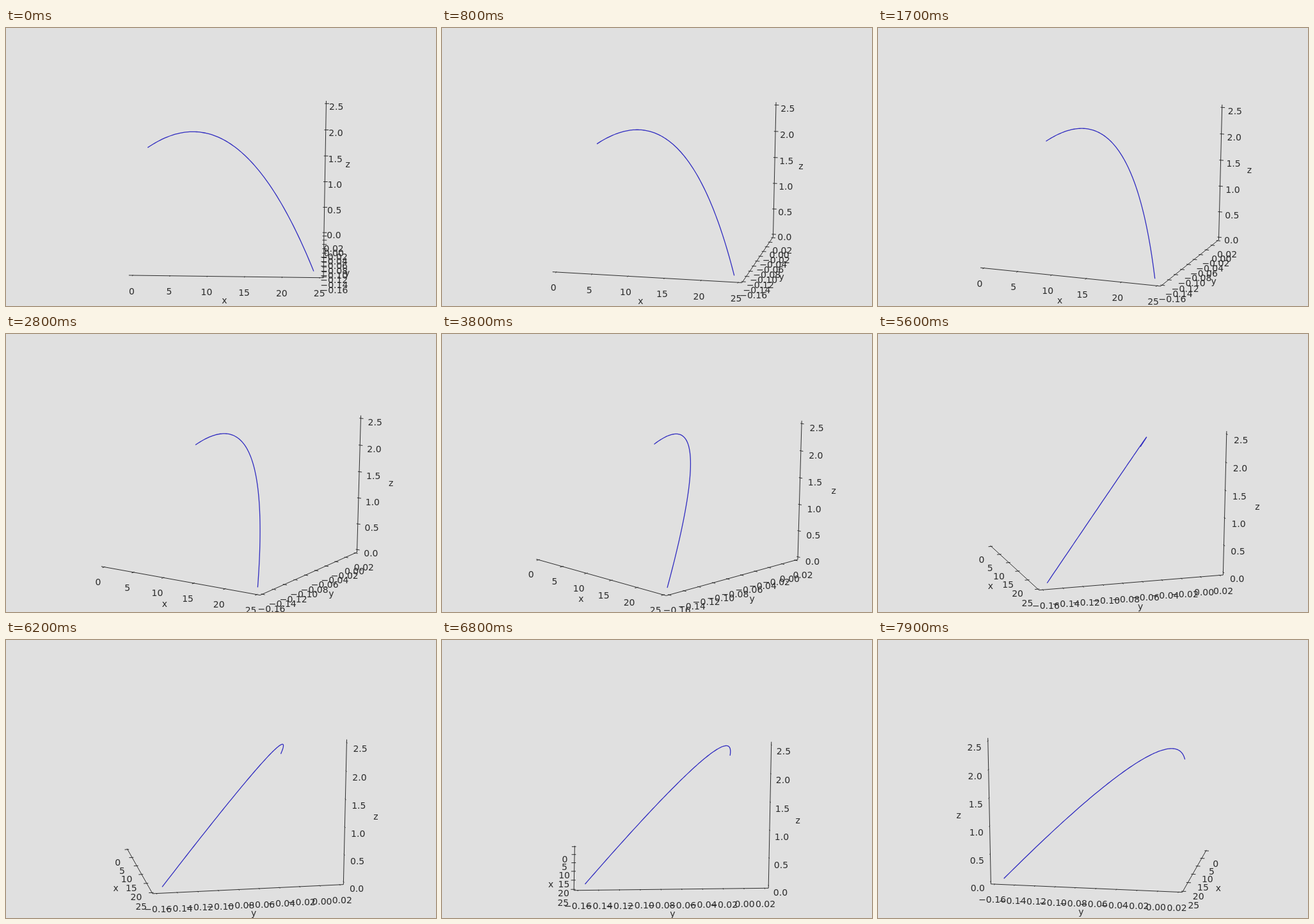
Recreate the animation shown at these times as an HTML page with a canvas. Size 672 by 435 pixels, loop 8 s.

```html
<!DOCTYPE html>
<html lang="en">
<head>
<meta charset="utf-8">
<title>Rotating trajectory plot</title>
<style>
  html, body { margin: 0; width: 100%; height: 100%; overflow: hidden; background: #e0e0e0; }
  canvas { display: block; }
</style>
</head>
<body>
<canvas id="stage" width="672" height="435"></canvas>
<script>
const ctx = document.getElementById('stage').getContext('2d');
const LOOP = 8000, STEP = 100;
const CENTER = { x: 351.6, y: 245.7 }, SCALE = { x: 2815, y: 2176 }, DIST = 10;
const INK = '#2c2c2c', CURVE = '#302cc0';
const DELTA = 1 / 12;              // spacing unit of the axes cube
const EDGE = 0.5 + DELTA / 4;      // axis lines overshoot the limits slightly
const TICK_GAP = EDGE + 0.7 * DELTA;
const LABEL_GAP = EDGE + 1.6 * DELTA;
const DRAG = 0.083;                // slows the flight along x

// [step, degrees]
const TURN = [[0, 3], [9, 13.4], [17, 20.6], [28, 33], [38, 45.3], [45, 55.8], [56, 72.3],
              [63, 80.6], [68, 87.4], [72, 92.2], [79, 100.2]];
const TILT = [[0, 14.3], [9, 16], [17, 16.7], [28, 17], [38, 16.7], [56, 15.6], [68, 15.2], [79, 14.2]];

const AXES = {
  x: { min: 0, max: 25, step: 5, digits: 0 },
  y: { min: -0.16, max: 0.02, step: 0.02, digits: 2 },
  z: { min: 0, max: 2.5, step: 0.5, digits: 1 }
};
const norm = (axis, v) => (v - AXES[axis].min) / (AXES[axis].max - AXES[axis].min) - 0.5;

// Smooth curve through the keys (Hermite with finite-difference slopes)
function track(keys, t) {
  const last = keys.length - 1;
  const slope = i => {
    const a = keys[Math.max(i - 1, 0)], b = keys[Math.min(i + 1, last)];
    return (b[1] - a[1]) / (b[0] - a[0]);
  };
  let i = 0;
  while (i < last - 1 && t > keys[i + 1][0]) i++;
  const [t0, v0] = keys[i], [t1, v1] = keys[i + 1];
  const h = t1 - t0, s = (t - t0) / h, s2 = s * s, s3 = s2 * s;
  return v0 * (2 * s3 - 3 * s2 + 1) + slope(i) * h * (s3 - 2 * s2 + s)
       + v1 * (3 * s2 - 2 * s3) + slope(i + 1) * h * (s3 - s2);
}

function makeCamera(azim, elev) {
  const ca = Math.cos(azim), sa = Math.sin(azim), ce = Math.cos(elev), se = Math.sin(elev);
  return ({ x, y, z }) => {
    const toward = ca * x + sa * y;
    const w = DIST - ce * toward - se * z;
    return [CENTER.x + SCALE.x * (ca * y - sa * x) / w,
            CENTER.y - SCALE.y * (ce * z - se * toward) / w];
  };
}

function stroke(points, color, width) {
  ctx.beginPath();
  points.forEach(p => ctx.lineTo(p[0], p[1]));
  ctx.strokeStyle = color;
  ctx.lineWidth = width;
  ctx.stroke();
}

// side: signs of the two fixed coordinates; tickDir: coordinate the ticks run along
function drawAxis(project, name, side, tickDir, drop) {
  const { min, max, step, digits } = AXES[name];
  const at = (along, out) => {
    const p = { [name]: along };
    for (const k in side) p[k] = side[k] * out;
    return p;
  };
  stroke([project(at(-EDGE, EDGE)), project(at(EDGE, EDGE))], INK, 1);

  const count = Math.round((max - min) / step);
  for (let i = 0; i <= count; i++) {
    const along = i / count - 0.5;
    const tick = [0.2, -0.1].map(f => {
      const p = at(along, EDGE);
      p[tickDir] += side[tickDir] * f * DELTA;
      return project(p);
    });
    stroke(tick, INK, 1);

    let value = min + i * step;
    if (Math.abs(value) < 1e-9) value = 0;
    const [x, y] = project(at(along, TICK_GAP));
    ctx.fillText(value.toFixed(digits).replace('-', '\u2212'), x, y + drop);
  }
  const [x, y] = project(at(0, LABEL_GAP));
  ctx.fillText(name, x, y + 3.9);
}

function drawCurve(project) {
  const points = [];
  for (let i = 0; i <= 100; i++) {
    const t = i / 100;
    points.push(project({
      x: norm('x', 24.2 * (t + DRAG * t * (1 - t))),
      y: norm('y', -0.153 * t * t),
      z: norm('z', 1.705 + 2.36 * t - 4.05 * t * t)
    }));
  }
  stroke(points, CURVE, 1.3);
}

function draw(step) {
  const turn = track(TURN, step), rad = Math.PI / 180;
  const project = makeCamera((turn - 90) * rad, track(TILT, step) * rad);
  const right = turn < 90 ? 1 : -1;

  ctx.fillStyle = '#e0e0e0';
  ctx.fillRect(0, 0, 672, 435);
  ctx.fillStyle = INK;
  ctx.font = '14px "DejaVu Sans", sans-serif';
  ctx.textAlign = 'center';
  ctx.textBaseline = 'alphabetic';
  ctx.lineJoin = 'round';

  drawAxis(project, 'x', { y: -right, z: -1 }, 'y', 12.9);
  drawAxis(project, 'y', { x: 1, z: -1 }, 'x', 12.9);
  drawAxis(project, 'z', { x: 1, y: right }, 'x', 12.3);
  drawCurve(project);
}

const start = performance.now();
function loop() {
  const time = (performance.now() - start) % LOOP;
  draw(Math.floor(time / STEP));
  requestAnimationFrame(loop);
}
loop();
</script>
</body>
</html>
```
